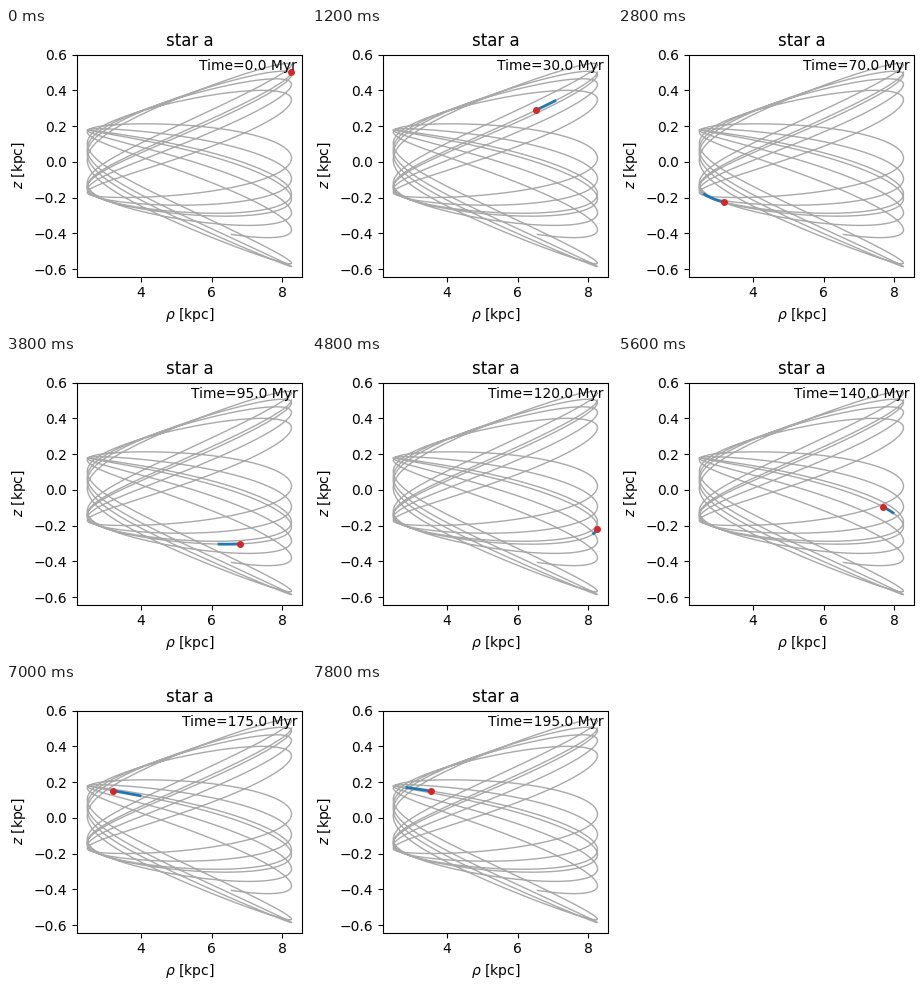
Recreate the animation shown at these times as a matplotlib script. Size 300 px wide and 300 px high, loop 8000 ms.

```python
import numpy as np
import matplotlib.pyplot as plt
from matplotlib.animation import FuncAnimation

STEP = 5.0            # Myr per frame
FRAMES = 40
T_END = 1500.0        # length of the full orbit, Myr
PERIOD = 122.53       # radial period, Myr
R_MIN, R_MAX = 2.479, 8.262
ECC = 0.41            # time skew between apocentre and pericentre
PHASE0, TURN = 0.545, 3.8093   # vertical phase: start, gain per period


def make_orbit(turns=13):
    """Sample time, radius and height along the orbit, starting at apocentre."""
    eta = np.pi + np.linspace(0, 2 * np.pi * turns, 2000 * turns + 1)
    mid, amp = (R_MAX + R_MIN) / 2, (R_MAX - R_MIN) / 2
    time = (eta - ECC * np.sin(eta) - np.pi) * PERIOD / (2 * np.pi)
    rho = mid - amp * np.cos(eta)

    # vertical phase advances as 1 / rho^2
    rate = 1 / rho**2
    area = np.diff(time) * (rate[1:] + rate[:-1]) / 2
    phase = np.concatenate([[0], np.cumsum(area)])
    phase = PHASE0 + phase * turns * TURN / phase[-1]

    height = 0.179 + 0.0707 * (rho - R_MIN)
    return time, rho, height * np.cos(phase)


TIME, RHO, Z = make_orbit()


def track(t):
    return np.interp(t, TIME, RHO), np.interp(t, TIME, Z)


fig, ax = plt.subplots(figsize=(3, 3), dpi=100, layout="constrained")
ax.set_xlim(2.19, 8.555)
ax.set_ylim(-0.642, 0.6005)
ax.set_xticks([4, 6, 8])
ax.set_yticks(np.arange(-3, 4) / 5)
ax.set_title("star a")
ax.set_xlabel(r"$\rho$ [kpc]")
ax.set_ylabel(r"$z$ [kpc]")

ax.plot(*track(np.linspace(0, T_END, 6000)), color="darkgray", lw=1)
trail, = ax.plot([], [], color="tab:blue", lw=2)
dot, = ax.plot([], [], "o", color="tab:red", ms=4)
label = ax.text(0.98, 0.98, "", transform=ax.transAxes, ha="right", va="top")


def draw(i):
    t = i * STEP
    if i:
        trail.set_data(*track(np.linspace(t - STEP, t, 12)))
    else:
        trail.set_data([], [])
    x, y = track(t)
    dot.set_data([x], [y])
    label.set_text(f"Time={t:.1f} Myr")
    return trail, dot, label


anim = FuncAnimation(fig, draw, frames=FRAMES, init_func=lambda: draw(0),
                     interval=1000 * STEP / 25, repeat=True, repeat_delay=0)
plt.show()
```
